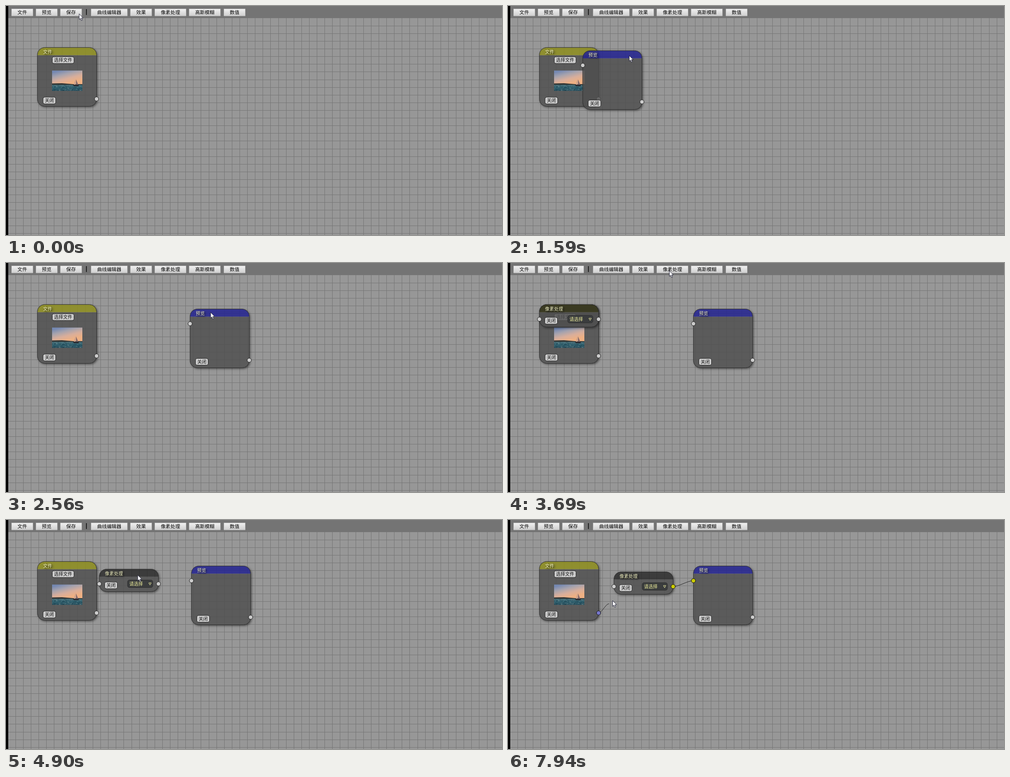
An HTML page with a canvas for the animation above (8000 ms loop, 1098 by 510 pixels).

```html
<!DOCTYPE html>
<html lang="zh-CN">
<head>
<meta charset="utf-8">
<style>
html, body { margin: 0; width: 100%; height: 100%; overflow: hidden; background: #979797; }
canvas { display: block; }
</style>
</head>
<body>
<canvas id="stage" width="1098" height="510"></canvas>
<script>
const ctx = document.getElementById('stage').getContext('2d');
const W = 1098, H = 510, LOOP = 8000, TICK = 132;
const FONT = '"Noto Sans CJK SC", "Noto Sans CJK", sans-serif';
const PORT = { idle: '#cccccc', active: '#7777cc', linked: '#cccc00' };
const NODE_W = 131, BIG_H = 131, SMALL_H = 50;

// Places the pointer visits.
const SPOT = {
  save: [162, 17], previewButton: [92, 14], previewTitle: [112, 100], dropNear: [432, 110],
  dropPreview: [453, 109.5], pixelButton: [364, 14], pixelTitle: [150, 104], passing: [288, 121.5],
  dropPixel: [315, 127], pixelOut: [366, 148], previewIn: [410.5, 135], rest: [235, 187],
  fileOut: [203, 205], towardPixel: [244, 168]
};

// Pointer moves in order: start, end, destination, sag of the path.
const MOVES = [
  [130, 540, SPOT.previewButton], [660, 1190, SPOT.previewTitle], [1200, 1980, SPOT.dropNear, 5],
  [2100, 2500, SPOT.dropPreview], [3000, 3400, SPOT.pixelButton], [3500, 4100, SPOT.pixelTitle],
  [4370, 4800, SPOT.passing], [4800, 5160, SPOT.dropPixel], [5280, 6080, SPOT.pixelOut],
  [6130, 6430, SPOT.previewIn], [6600, 7120, SPOT.rest], [7270, 7540, SPOT.fileOut],
  [7780, 8000, SPOT.towardPixel]
];

// Moments at which something is pressed or released.
const WHEN = { previewAdded: 600, previewGrab: 1200, previewDrop: 2900, pixelAdded: 3450,
  pixelGrab: 4370, pixelDrop: 5270, wireStart: 6130, wireEnd: 6440, secondWire: 7780 };
const NODE_LAG = 100, WIRE_LAG = 30;

const clamp = (v, lo, hi) => Math.min(hi, Math.max(lo, v));
const smooth = p => p * p * (3 - 2 * p);

function pointerAt(t) {
  let [x, y] = SPOT.save;
  for (const [start, end, [toX, toY], sag = 0] of MOVES) {
    if (t < start) break;
    const k = smooth(clamp((t - start) / (end - start), 0, 1));
    x += (toX - x) * k;
    y += (toY - y) * k + sag * Math.sin(Math.PI * k);
  }
  return [x, y];
}

// New nodes appear at the same home place and trail the pointer while dragged.
function draggedNode(t, grab, drop) {
  const [x0, y0] = pointerAt(grab);
  const [x, y] = pointerAt(clamp(t - NODE_LAG, grab, drop));
  return [Math.round(70 + x - x0) - 0.5, Math.round(93 + y - y0) - 0.5];
}

function paint(fill, stroke) {
  if (fill) { ctx.fillStyle = fill; ctx.fill(); }
  if (stroke) { ctx.strokeStyle = stroke; ctx.lineWidth = 1; ctx.stroke(); }
}

function box(x, y, w, h, r, fill, stroke) {
  ctx.beginPath();
  ctx.roundRect(x, y, w, h, r);
  paint(fill, stroke);
}

function polygon(points, fill, stroke) {
  ctx.beginPath();
  points.forEach(([x, y]) => ctx.lineTo(x, y));
  ctx.closePath();
  paint(fill, stroke);
}

function label(text, x, y, size, color, align = 'left', weight = 400) {
  ctx.font = `${weight} ${size}px ${FONT}`;
  ctx.textAlign = align;
  ctx.fillStyle = color;
  ctx.fillText(text, x, y);
}

function gradient(x0, y0, x1, y1, ...colors) {
  const g = ctx.createLinearGradient(x0, y0, x1, y1);
  colors.forEach((c, i) => g.addColorStop(i / (colors.length - 1), c));
  return g;
}

function drawGrid() {
  ctx.fillStyle = '#979797';
  ctx.fillRect(0, 0, W, H);
  ctx.fillStyle = '#767676';
  for (let x = 21.35; x < W; x += 17.11) ctx.fillRect(Math.floor(x), 27, 1, H);
  for (let y = 44.25; y < H; y += 17.11) ctx.fillRect(0, Math.floor(y), W, 1);
}

function drawToolbar() {
  ctx.fillStyle = '#747474';
  ctx.fillRect(0, 0, W, 27);
  ctx.fillStyle = '#000';
  ctx.fillRect(0, 0, 5, H);
  ctx.fillStyle = '#222';
  ctx.fillRect(177, 7, 2, 13);
  let x = 12;
  for (const text of ['文件', '预览', '保存', '|', '曲线编辑器', '效果', '像素处理', '高斯模糊', '数值']) {
    if (text === '|') { x += 13.3; continue; }
    const w = 25.3 + 11.1 * text.length;
    const left = Math.round(x), width = Math.round(w);
    box(left + 0.5, 6.5, width - 1, 15.5, 0, gradient(0, 6, 0, 22, '#f2f2f2', '#cfcfcf'), '#c0c0c0');
    label(text, left + width / 2, 18, 10.67, '#000', 'center', 500);
    x += w + 6.6;
  }
}

function drawNode(x, y, h, title, headColor) {
  const r = 16, head = 17;
  ctx.save();
  ctx.beginPath();
  ctx.rect(0, 0, W, H);
  ctx.roundRect(x, y, NODE_W, h, r);
  ctx.clip('evenodd');
  ctx.shadowColor = 'rgba(0,0,0,.55)';
  ctx.shadowBlur = 5;
  ctx.shadowOffsetX = ctx.shadowOffsetY = 2;
  box(x, y, NODE_W, h, r, '#000');
  ctx.restore();

  box(x, y + head, NODE_W, h - head, [0, 0, r, r], 'rgba(78,78,78,.81)');
  box(x, y, NODE_W, head, [r, r, 0, 0], headColor);
  box(x, y, NODE_W, h, r, null, '#303030');

  ctx.save();
  ctx.shadowColor = '#000';
  ctx.shadowBlur = 4;
  ctx.shadowOffsetX = ctx.shadowOffsetY = 2;
  label(title, x + 12.5, y + 13.3, 10, '#f4f4c4');
  ctx.restore();
}

function nodeButton(text, x, y, w) {
  box(x, y, w, 15, 3.5, '#cccccc', '#222');
  label(text, x + w / 2, y + 11.3, 10, '#111', 'center');
}

function port(x, y, color) {
  ctx.beginPath();
  ctx.arc(x, y, 4.6, 0, Math.PI * 2);
  paint(color, '#181818');
}

function wire([x0, y0], [x1, y1]) {
  const bend = (x1 - x0) * 0.3;
  ctx.beginPath();
  ctx.moveTo(x0, y0);
  ctx.bezierCurveTo(x0 + bend, y0, x1 - bend, y1, x1, y1);
  paint(null, '#222');
}

function drawSeascape(x, y) {
  const w = 67, h = 45.5, horizon = 31;
  let seed = 7;
  const random = () => (seed = seed * 16807 % 2147483647) / 2147483647;
  ctx.save();
  ctx.translate(x, y);
  ctx.beginPath();
  ctx.rect(0, 0, w, h);
  ctx.clip();
  ctx.fillStyle = gradient(18, 0, 26, horizon, '#7488b2', '#a7a3ad', '#d8ae9b', '#eeb083');
  ctx.fillRect(0, 0, w, horizon);
  ctx.fillStyle = gradient(0, horizon, 0, h, '#4f7680', '#2f5f6d', '#28505f');
  ctx.fillRect(0, horizon, w, h);
  for (let i = 0; i < 130; i++) {
    ctx.fillStyle = i % 2 ? 'rgba(140,165,165,.45)' : 'rgba(10,40,55,.45)';
    ctx.fillRect(random() * w, horizon + 1 + random() * 14, 1 + random() * 3, 0.9);
  }
  polygon([[0, 29], [22, 28.5], [46, 30.5], [w, 30.5], [w, 32], [0, 32]], '#303433');
  polygon([[52, 19], [52, 32], [48, 32]], '#c9a08c');
  polygon([[53, 20], [58, 32], [53, 32]], '#80666a');
  polygon([[46, 32], [60, 32], [58, 35], [48, 35]], '#29272d');
  ctx.restore();
}

function drawFileNode(x, y, active) {
  drawNode(x, y, BIG_H, '文件', 'rgba(143,143,34,.88)');
  nodeButton('选择文件', x + 33, y + 20.5, 48);
  drawSeascape(x + 32.5, y + 51);
  nodeButton('关闭', x + 12.5, y + 110.5, 28);
  port(x + NODE_W, y + 114.5, active ? PORT.active : PORT.idle);
}

function drawPreviewNode(x, y, linked) {
  drawNode(x, y, BIG_H, '预览', 'rgba(36,36,145,.86)');
  nodeButton('关闭', x + 12, y + 110, 28);
  port(x, y + 32.7, linked ? PORT.linked : PORT.idle);
  port(x + NODE_W, y + 114, PORT.idle);
}

function drawPixelNode(x, y, outColor) {
  drawNode(x, y, SMALL_H, '像素处理', 'rgba(30,30,30,.75)');
  nodeButton('关闭', x + 12, y + 28.5, 28);
  box(x + 62.5, y + 24, 56, 17, 4.5, '#3a3c3d', '#303030');
  label('请选择', x + 66.5, y + 36, 10, '#f5f5a0');
  polygon([[x + 109.5, y + 30.5], [x + 115, y + 30.5], [x + 112.2, y + 35.5]], null, '#e8e8a0');
  port(x, y + 32.7, PORT.idle);
  port(x + NODE_W, y + 32.7, outColor);
}

function drawPointer([x, y]) {
  ctx.save();
  ctx.translate(x, y);
  polygon([[0, 0.5], [0, 13], [2.8, 10.5], [4.8, 15.3], [6.9, 14.4], [4.9, 9.8], [8.8, 9.6]], '#fff', '#24243a');
  ctx.restore();
}

function render(time) {
  const t = Math.floor(time / TICK) * TICK;
  const linked = t >= WHEN.wireEnd;
  const wiring = t >= WHEN.wireStart;
  const second = t >= WHEN.secondWire;
  const preview = draggedNode(t, WHEN.previewGrab, WHEN.previewDrop);
  const pixel = draggedNode(t, WHEN.pixelGrab, WHEN.pixelDrop);
  const fileOut = [200.5, 207];
  const pixelOut = [pixel[0] + NODE_W, pixel[1] + 32.7];
  const previewIn = [preview[0], preview[1] + 32.7];
  const outColor = linked ? PORT.linked : wiring ? PORT.active : PORT.idle;

  drawGrid();
  drawToolbar();
  drawFileNode(69.5, 92.5, second);
  if (t >= WHEN.previewAdded) drawPreviewNode(...preview, linked);
  if (t >= WHEN.pixelAdded) drawPixelNode(...pixel, outColor);
  if (wiring) {
    wire(pixelOut, linked ? previewIn : pointerAt(t - WIRE_LAG));
    port(...pixelOut, outColor);
    if (linked) port(...previewIn, PORT.linked);
  }
  if (second) {
    wire(fileOut, pointerAt(t - WIRE_LAG));
    port(...fileOut, PORT.active);
  }
  drawPointer(pointerAt(t));
}

const begin = performance.now();
function tick() {
  render((performance.now() - begin) % LOOP);
  requestAnimationFrame(tick);
}
tick();
</script>
</body>
</html>
```
